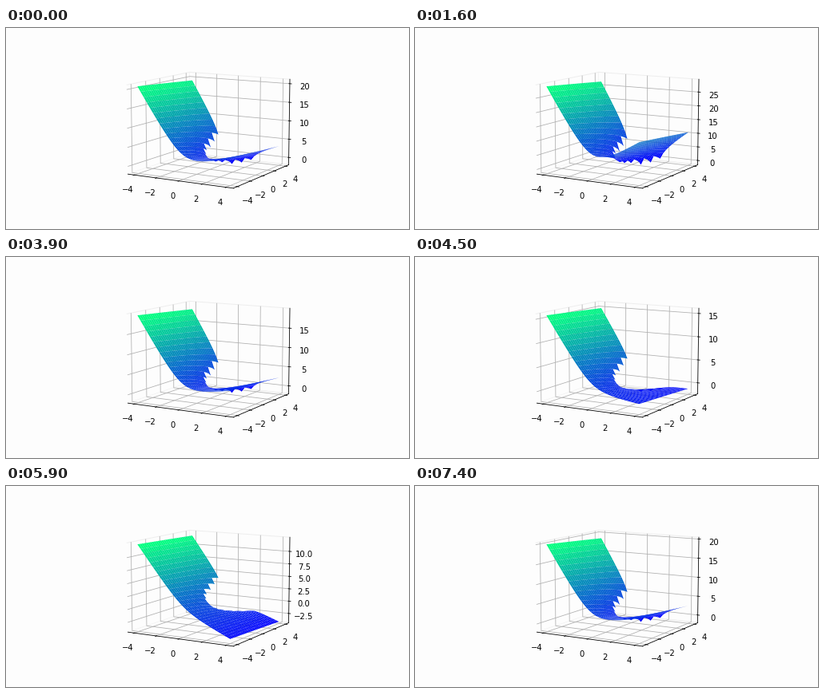
Write a matplotlib script that moves like this. It is 504x252 px and loops after 7.5 s.

```python
import numpy as np
import matplotlib.pyplot as plt
from matplotlib.animation import FuncAnimation
from matplotlib.ticker import MaxNLocator
from mpl_toolkits.mplot3d.art3d import Poly3DCollection

W, H, DPI = 504, 252, 72
FRAMES, INTERVAL = 75, 100
SIDE = H - 2 * 10.8  # square axes inside a tight margin
PAPER, PANE_EDGE = "#fdfdfd", "#eeeeee"

grid = np.linspace(-4, 4, 30)
X, Y = np.meshgrid(grid, grid)
inner = X**2 - Y / 2
root = np.sqrt(np.where(inner >= 0, inner, np.nan))


def quads(z):
    """Corner points of every grid cell, shape (cells, 4, 3)."""
    p = np.dstack([X, Y, z])
    corners = [p[:-1, :-1], p[:-1, 1:], p[1:, 1:], p[1:, :-1]]
    return np.stack(corners, axis=2).reshape(-1, 4, 3)


solid = ~np.isnan(quads(root)).any(axis=(1, 2))

fig = plt.figure(figsize=(W / DPI, H / DPI), dpi=DPI, facecolor=PAPER)
ax = fig.add_axes([(W - SIDE) / 2 / W, (H - SIDE) / 2 / H, SIDE / W, SIDE / H],
                  projection="3d", facecolor=PAPER)
ax.view_init(elev=10, azim=-60)
for axis in (ax.xaxis, ax.yaxis, ax.zaxis):
    axis.set_pane_color(PAPER)
    axis.pane.set_edgecolor(PANE_EDGE)

ticks = [-4, -2, 0, 2, 4]
edge = 4.4 * 25 / 24
ax.set(xticks=ticks, yticks=ticks, xlim=(-edge, edge), ylim=(-edge, edge))

surface = Poly3DCollection(quads(root)[solid], cmap="winter", linewidth=0)
ax.add_collection3d(surface)
z_locator = MaxNLocator(nbins=7, steps=[1, 2, 2.5, 5, 10])


def draw(i):
    gain = 3 + 2 * np.sin(2 * np.pi * i / FRAMES)
    z = -2 * X + gain * root
    cells = quads(z)[solid]
    surface.set_verts(cells)
    surface.set_array(cells[:, :, 2].mean(axis=1))
    surface.autoscale()

    lo, hi = np.nanmin(z), np.nanmax(z)
    marks = z_locator.tick_values(lo, hi)
    pad = (hi - lo) / 48
    ax.set_zticks(marks[(marks >= lo) & (marks <= hi)])
    ax.set_zlim(lo - pad, hi + pad)
    return (surface,)


anim = FuncAnimation(fig, draw, frames=FRAMES, interval=INTERVAL,
                     init_func=lambda: draw(0), repeat=True, repeat_delay=0)
plt.show()
```
